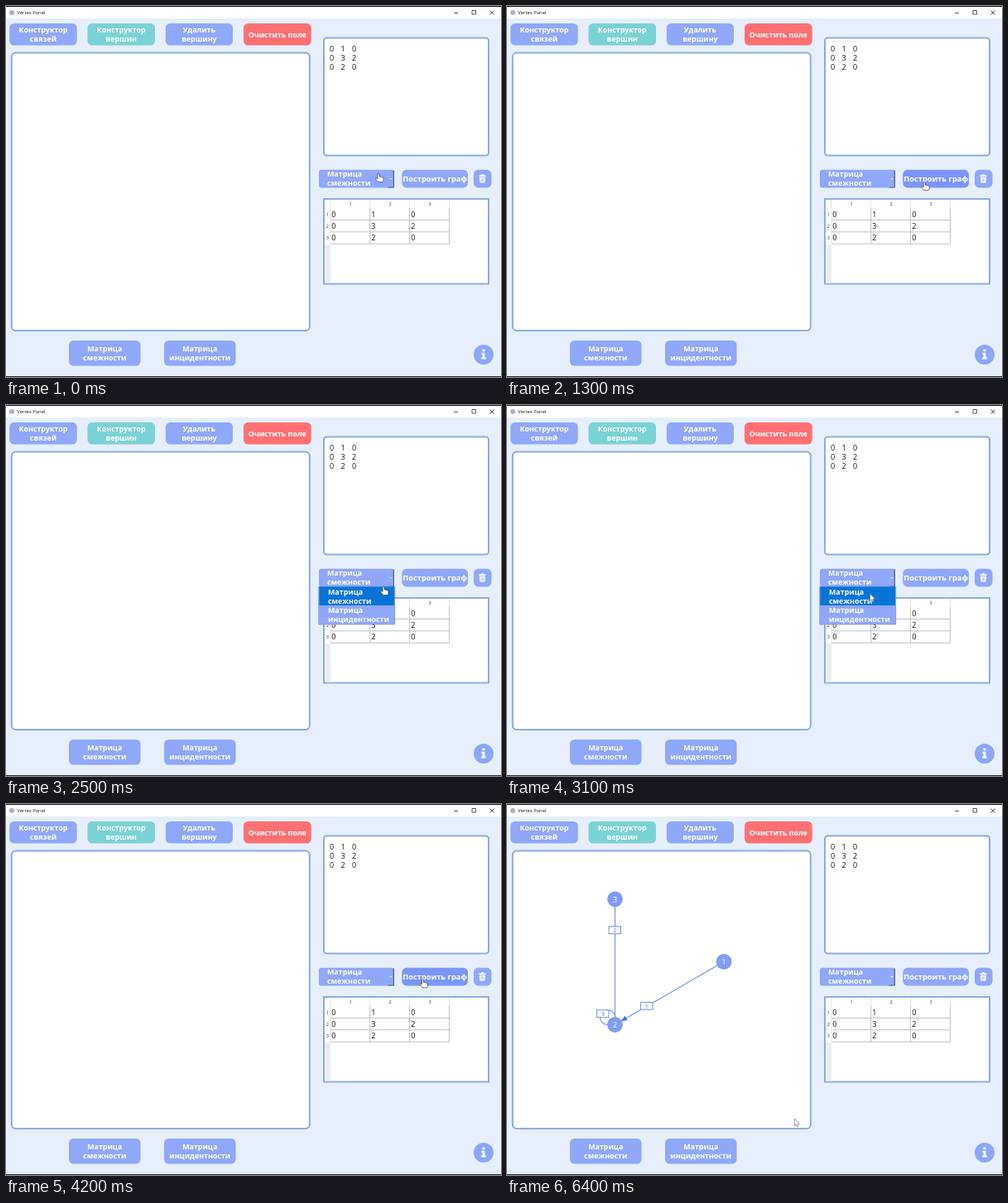
An HTML page that plays this animation: 598 px wide and 448 px high, repeating every 6500 ms.

```html
<!DOCTYPE html>
<html lang="ru">
<head>
<meta charset="utf-8">
<title>Vertex Panel</title>
<style>
html, body { margin: 0; width: 100%; height: 100%; overflow: hidden; background: #e6effb; }
svg { display: block; width: 598px; height: 448px; font-family: "Open Sans", "Noto Sans", sans-serif; }
.label { font-weight: 700; font-size: 8.9px; fill: #fff; }
.digit { font-size: 9px; fill: #111; }
.head { font-size: 5.6px; fill: #333; text-anchor: middle; }
.node { font-size: 9.5px; fill: #fff; text-anchor: middle; }
.weight { font-size: 8px; fill: #6684d8; text-anchor: middle; }
.frame { fill: #fff; stroke: #8fabe6; stroke-width: 2; }
</style>
</head>
<body>
<svg id="stage" viewBox="0 0 598 448">
  <defs><clipPath id="below"><rect x="370" y="219" width="110" height="60"/></clipPath></defs>
  <rect width="598" height="448" fill="#e6effb"/>
  <rect width="598" height="15" fill="#fff"/>
  <rect width="598" height="1" fill="#15171f"/>
  <rect y="447" width="598" height="1" fill="#202a45"/>
  <circle cx="7" cy="8" r="3" fill="#a9b4c8"/>
  <text x="13.3" y="10.2" font-size="5.9" fill="#222">Vertex Panel</text>
  <path d="M541 8.5h5M563 5.5h4.5v4.5h-4.5zM584.5 5.5l5 5m0-5l-5 5" fill="none" stroke="#333" stroke-width=".8"/>

  <g id="buttons"></g>

  <rect class="frame" x="6.8" y="56.5" width="360" height="335.5" rx="5"/>
  <rect class="frame" x="384" y="38.5" width="199" height="142" rx="3.5"/>
  <rect class="frame" x="384" y="233" width="199" height="102.5"/>
  <rect x="385" y="288" width="7" height="46.5" fill="#ededf0"/>
  <path d="M392 234v53.5M439.7 234v10M487.6 234v10M535.5 234v10" stroke="#dcdcdf" stroke-width=".8"/>
  <path d="M392 258.5h143.5M392 272.8h143.5M392 287.2h143.5M439.7 244v43.2M487.6 244v43.2M535.5 244v43.2" stroke="#b9bac2" stroke-width=".9"/>
  <g id="numbers"></g>

  <path d="M468.4 198.5v20.5h-7" fill="none" stroke="#536087" stroke-width="1.2"/>
  <path d="M462 198.5v20" stroke="#9cb2fb" stroke-width=".8"/>
  <path d="M463.2 208h3.4l-1.7 1.6z" fill="#e8eeff"/>
  <g fill="#fff">
    <path d="M571.3 204.6h8.4v1.4h-8.4zM574 203.2h3v1.4h-3zM571.9 206.8h7.2l-.6 6.8h-6z"/>
    <path d="M574 208v4.4M575.5 208v4.4M577 208v4.4" stroke="#8fa8fa" stroke-width=".6"/>
  </g>
  <circle cx="577" cy="421" r="12" fill="#8ba6fb"/>
  <path d="M575.5 414.6h3v2.7h-3zM574.4 418.8h4v5.6h1.5v2h-5.8v-2h1.5v-3.6h-1.2z" fill="#fff"/>

  <g id="graph">
    <g fill="none" stroke="#7290e2" stroke-width="1.1">
      <path d="M130.5 115V266M262 190.5L138 262"/>
      <path d="M131 258C129.5 247 116 246 113.5 254S115 267 124 266.5"/>
    </g>
    <path d="M138.2 262l4.3-5.8 2.6 4.5z" fill="#4674d8" stroke="#4674d8" stroke-width=".6"/>
    <g id="marks"></g>
  </g>

  <g clip-path="url(#below)"><g id="popup">
    <rect x="377.8" y="219" width="92" height="46" fill="#8fa8fa" stroke="#7184bd" stroke-width=".6"/>
    <rect id="first" x="378.4" y="219.4" width="90.6" height="22.6"/>
    <rect id="second" x="378.4" y="242" width="90.6" height="22.6"/>
    <g id="items"></g>
  </g></g>

  <g id="cursor">
    <path id="hand" d="M-1 .8Q0-.6 1 .8V4.2Q2.2 3.5 2.8 4.6Q4 4 4.4 5.1Q6 4.7 6 6.2V8Q5.8 9.4 5 10.6H-.6Q-2 8.6-3.6 6.6Q-3.6 5-2.2 5.8L-1 6.8z" fill="#fff" stroke="#333d60" stroke-width=".7"/>
    <path id="arrow" d="M0 0V8.6L2 6.8L3.3 9.8L4.7 9.2L3.4 6.2H6.1z" fill="#fff" stroke="#66666c" stroke-width=".65"/>
  </g>
</svg>
<script>
const $ = id => document.getElementById(id);

function add(parent, tag, attrs, text = "") {
  const el = document.createElementNS("http://www.w3.org/2000/svg", tag);
  for (const key in attrs) el.setAttribute(key, attrs[key]);
  el.textContent = text;
  return $(parent).appendChild(el);
}

function button(x, y, width, height, lines, fill = "#8fa8fa", left) {
  const box = add("buttons", "rect", { x, y, width, height, rx: left ? 3 : 5.5, fill });
  const base = y + height / 2 + 3.2 - (lines.length - 1) * 5.6;
  lines.forEach((line, i) => add("buttons", "text", {
    class: "label", x: left || x + width / 2, y: base + i * 11.2,
    "text-anchor": left ? "start" : "middle"
  }, line));
  return box;
}

button(4.2, 21, 81.5, 26.6, ["Конструктор", "связей"]);
button(98.5, 21, 81.5, 26.6, ["Конструктор", "вершин"], "#7bd2d5");
button(192.8, 21, 81.2, 26.6, ["Удалить", "вершину"]);
button(287, 21, 81.7, 26.6, ["Очистить поле"], "#ff7072");
button(76, 404, 86.5, 30.5, ["Матрица", "смежности"]);
button(191, 404, 86.5, 30.5, ["Матрица", "инцидентности"]);
button(378, 197.8, 91, 21.6, ["Матрица", "смежности"], "#8fa8fa", 388);
button(565, 197.8, 21.5, 21.6, []);
const build = button(478.3, 197.8, 79.7, 21.6, ["Построить граф"]);
build.nextSibling.style.fontSize = "9.3px";

[[0, 1, 0], [0, 3, 2], [0, 2, 0]].forEach((row, r) => {
  row.forEach((value, c) => {
    add("numbers", "text", { class: "digit", x: 391 + c * 13.5, y: 54.8 + r * 11 }, value);
    add("numbers", "text", { class: "digit", x: 393.2 + c * 48, y: 254.8 + r * 14.3 }, value);
  });
  add("numbers", "text", { class: "head", x: 416 + r * 48, y: 241 }, r + 1);
  add("numbers", "text", { class: "head", x: 388.3, y: 253.8 + r * 14.3 }, r + 1);
});

[[262, 190.5], [130.5, 266.5], [130.5, 114.8]].forEach(([cx, cy], i) => {
  add("marks", "circle", { cx, cy, r: 9.4, fill: "#7f9cfa" });
  add("marks", "text", { class: "node", x: cx, y: cy + 3.7 }, i + 1);
});
[[168.8, 243.8, 1], [130.3, 152.3, 2], [115.8, 253.3, 3]].forEach(([x, y, value]) => {
  add("marks", "rect", { x: x - 7.2, y: y - 4.4, width: 14.4, height: 8.8, fill: "#fff", stroke: "#7290e2" });
  add("marks", "text", { class: "weight", x, y: y + 3 }, value);
});

const items = ["Матрица", "смежности", "Матрица", "инцидентности"].map((line, i) =>
  add("items", "text", { class: "label", x: 389, y: 229 + i * 11.1 }, line));

// time, x, y of the pointer tip
const track = [
  [0, 450, 202], [500, 450, 202], [1200, 503, 211.5], [1300, 504.2, 212], [1500, 504.2, 212],
  [1700, 460.2, 208], [2400, 460.2, 208], [2700, 444, 250], [2800, 444, 250], [3100, 438.6, 228],
  [3600, 438.6, 228], [4200, 503.5, 211.2], [5700, 503.5, 211.2], [6400, 347.3, 380], [6500, 347.3, 380]
];

function pointer(t) {
  const i = track.findIndex(step => step[0] > t);
  const [t0, x0, y0] = track[i - 1], [t1, x1, y1] = track[i];
  const p = (t - t0) / (t1 - t0), k = p * p * (3 - 2 * p);
  return [x0 + (x1 - x0) * k, y0 + (y1 - y0) * k];
}

const show = (id, on) => $(id).style.display = on ? "" : "none";

function draw(t) {
  const [x, y] = pointer(t);
  const inside = (a, b) => x >= a && x <= b && y >= 198 && y <= 219.5;
  const overBuild = inside(478, 558);
  const hand = overBuild || inside(378, 469);
  const opening = t < 2300;
  const lower = y > 242;

  build.setAttribute("fill", overBuild ? "#7b96fa" : "#8fa8fa");
  $("cursor").setAttribute("transform", `translate(${x} ${y})`);
  show("hand", hand);
  show("arrow", !hand);
  show("graph", t >= 5400);

  show("popup", t >= 2200 && t < 3500);
  $("popup").setAttribute("transform", `translate(0 ${opening ? -19 : 0})`);
  $("first").setAttribute("fill", opening ? "#e7ebf3" : lower ? "#8fa8fa" : "#0874d6");
  $("second").setAttribute("fill", lower ? "#0874d6" : "#8fa8fa");
  items[1].style.fill = opening ? "#222" : "#fff";
}

function tick() {
  draw(Math.floor(performance.now() % 6500 / 100) * 100);
  requestAnimationFrame(tick);
}
tick();
</script>
</body>
</html>
```
